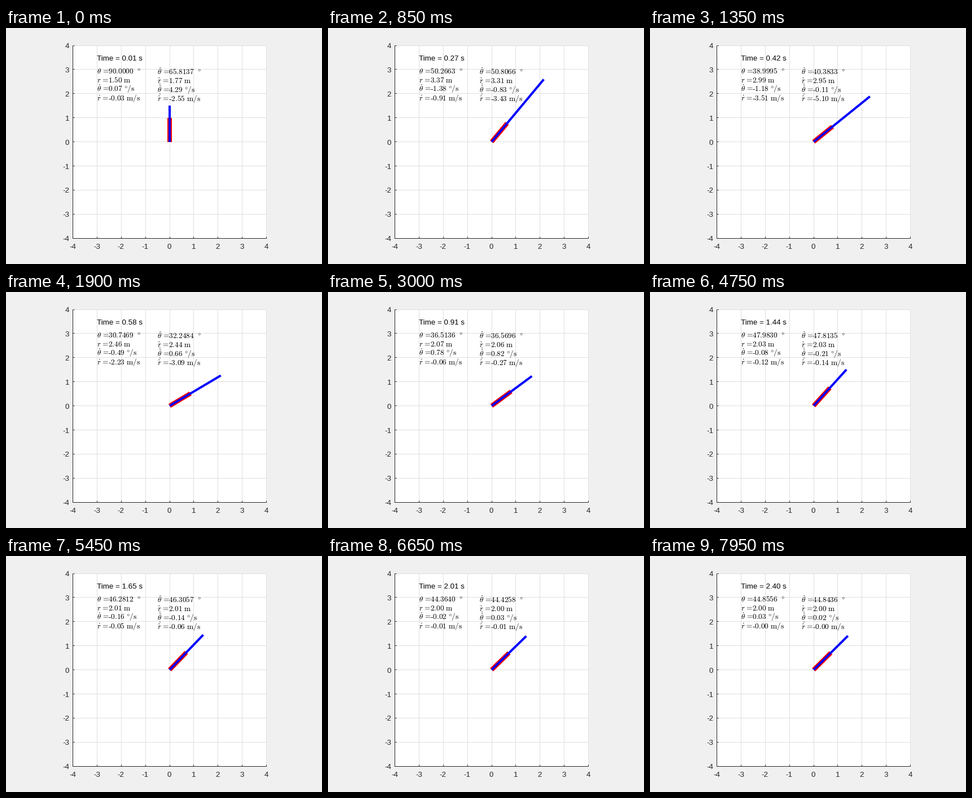
A matplotlib script that plays this animation: 560 by 420 pixels, repeating every 8000 ms.

```python
import math

import matplotlib.pyplot as plt
import numpy as np
from matplotlib.animation import FuncAnimation

W, H, DPI = 560, 420, 100
PX = 72 / DPI                     # points per pixel
FRAMES, STEP_MS = 160, 50
START, STEP = 0.01, 0.015         # simulated seconds
LEFT, TOP, UNIT = 118, 30.55, 42.875
RIGHT, BOTTOM = LEFT + 8 * UNIT, TOP + 8 * UNIT
FONT = 40 / 3 * PX
INK, GRID = "#262626", "#dfdfdf"

plt.rcParams["font.family"] = "Liberation Sans"
plt.rcParams["mathtext.fontset"] = "cm"

GOAL_ANGLE, GOAL_REACH = math.pi / 4, 2
DECAY, FREQ = 2.3, 4.6
STIFF = DECAY ** 2 + FREQ ** 2

# Key poses of the swing: time, angle, angle rate, reach, reach rate.
KEYS = [(0.01, math.radians(90), 0.07, 1.5, -0.03),
        (0.265, math.radians(50.2663), -1.38, 3.37, -0.91),
        (0.58, math.radians(30.7469), -0.49, 2.46, -2.23),
        (0.91, math.radians(36.5136), 0.78, 2.07, -0.06)]


def hermite(s, h, x0, v0, x1, v1):
    """Value and rate of a cubic with given ends, s from 0 to 1."""
    d = x1 - x0
    poly = [(v0 + v1) * h - 2 * d, 3 * d - (2 * v0 + v1) * h, v0 * h, x0]
    return np.polyval(poly, s), np.polyval(np.polyder(poly), s) / h


def settle(u):
    """Damped swing of the angle and fading bump of the reach."""
    x, v = KEYS[-1][1] - GOAL_ANGLE, KEYS[-1][2]
    c, s = math.cos(FREQ * u), math.sin(FREQ * u) / FREQ
    fade = math.exp(-DECAY * u)
    angle = GOAL_ANGLE + fade * (x * c + (v + DECAY * x) * s)
    rate = fade * (v * c - (DECAY * v + STIFF * x) * s)
    bump = 1 + 7 * u + 74 * u * u
    tail = 0.07 * math.exp(-8 * u)
    return angle, rate, GOAL_REACH + tail * bump, tail * (7 + 148 * u - 8 * bump)


def motion(t):
    """Angle, angle rate, reach and reach rate."""
    for (t0, *a), (t1, *b) in zip(KEYS, KEYS[1:]):
        if t < t1:
            h = t1 - t0
            s = (t - t0) / h
            return (*hermite(s, h, *a[:2], *b[:2]),
                    *hermite(s, h, *a[2:], *b[2:]))
    return settle(t - KEYS[-1][0])


def observer_error(t, angle, rate):
    """A start error that fades, then a lag that follows the pull."""
    u = t - START
    pull = -2 * DECAY * rate - STIFF * (angle - GOAL_ANGLE)
    fade = math.exp(-u / 0.05)
    reach_rate = -2.52 * (1 + 12 * u) * math.exp(-5.5 * u)
    return (0.17 * pull - 20.6 * fade, 0.025 * reach_rate + 0.33 * fade,
            0.13 * pull + 6.96 * fade, reach_rate)


def sx(x):
    return LEFT + (x + 4) * UNIT


def sy(y):
    return TOP + (4 - y) * UNIT


fig = plt.figure(figsize=(W / DPI, H / DPI), dpi=DPI, facecolor="#f0f0f0")
ax = fig.add_axes([0, 0, 1, 1])
ax.set_xlim(0, W)
ax.set_ylim(H, 0)
ax.axis("off")


def line(xs, ys, color, width=1, z=1):
    return ax.plot(xs, ys, color=color, lw=width * PX, zorder=z,
                   solid_capstyle="butt")[0]


def label(x, y, text="", color="black", ha="left"):
    return ax.text(x, y, text, color=color, ha=ha, va="baseline",
                   fontsize=FONT, zorder=5)


ax.add_patch(plt.Rectangle((LEFT, TOP), RIGHT - LEFT, BOTTOM - TOP,
                           fc="white", ec="none", zorder=0))
for n in range(-4, 5):
    x, y = sx(n), sy(n)
    line([x, x], [TOP, BOTTOM], GRID)
    line([LEFT, RIGHT], [y, y], GRID)
    line([x, x], [BOTTOM - 3, BOTTOM], INK, z=2)
    line([LEFT, LEFT + 3], [y, y], INK, z=2)
    label(x, 393, str(n), INK, "center")
    label(112, y + 5.6, str(n), INK, "right")
line([LEFT, LEFT], [TOP, BOTTOM], INK, z=2)
line([LEFT, RIGHT], [BOTTOM, BOTTOM], INK, z=2)

sleeve = line([], [], "red", 8, 3)
rod = line([], [], "blue", 4, 4)
clock = label(161, 58)
actual = [label(161, 81 + 16 * k) for k in range(4)]
estimate = [label(268, 83 + 16 * k) for k in range(4)]

NAMES = [r"\theta", "r", r"\dot{\theta}", r"\dot{r}"]
HAT_NAMES = [r"\hat{\theta}", r"\hat{r}", r"\dot{\hat{\theta}}",
             r"\dot{\hat{r}}"]
UNITS = [r"\ \degree", r"\text{m}", r"\degree\text{/s}", r"\text{m/s}"]
DIGITS = [4, 2, 2, 2]


def show(rows, names, values):
    for row, name, value, digits, unit in zip(rows, names, values, DIGITS,
                                              UNITS):
        number = f"{value:.{digits}f}".replace("-", "\u2010")
        row.set_text(rf"${name}\ \text{{={number}}}\ {unit}$")


def reach_out(bar, angle, length):
    """Lay a bar from the pivot, measured from pixel centres."""
    x, y = length * math.cos(angle), length * math.sin(angle)
    bar.set_data([sx(0) + 0.5, sx(x) + 0.5], [sy(0) + 0.5, sy(y) + 0.5])


def draw(i):
    t = START + STEP * i
    angle, rate, reach, reach_rate = motion(t)
    reach_out(sleeve, angle, 1)
    reach_out(rod, angle, reach)
    clock.set_text(f"Time = {t + 1e-9:.2f} s")
    state = [math.degrees(angle), reach, rate, reach_rate]
    error = observer_error(t, angle, rate)
    show(actual, NAMES, state)
    show(estimate, HAT_NAMES, [v + e for v, e in zip(state, error)])
    return [sleeve, rod, clock, *actual, *estimate]


anim = FuncAnimation(fig, draw, frames=FRAMES, interval=STEP_MS, repeat=True,
                     repeat_delay=0, blit=False)
plt.show()
```
